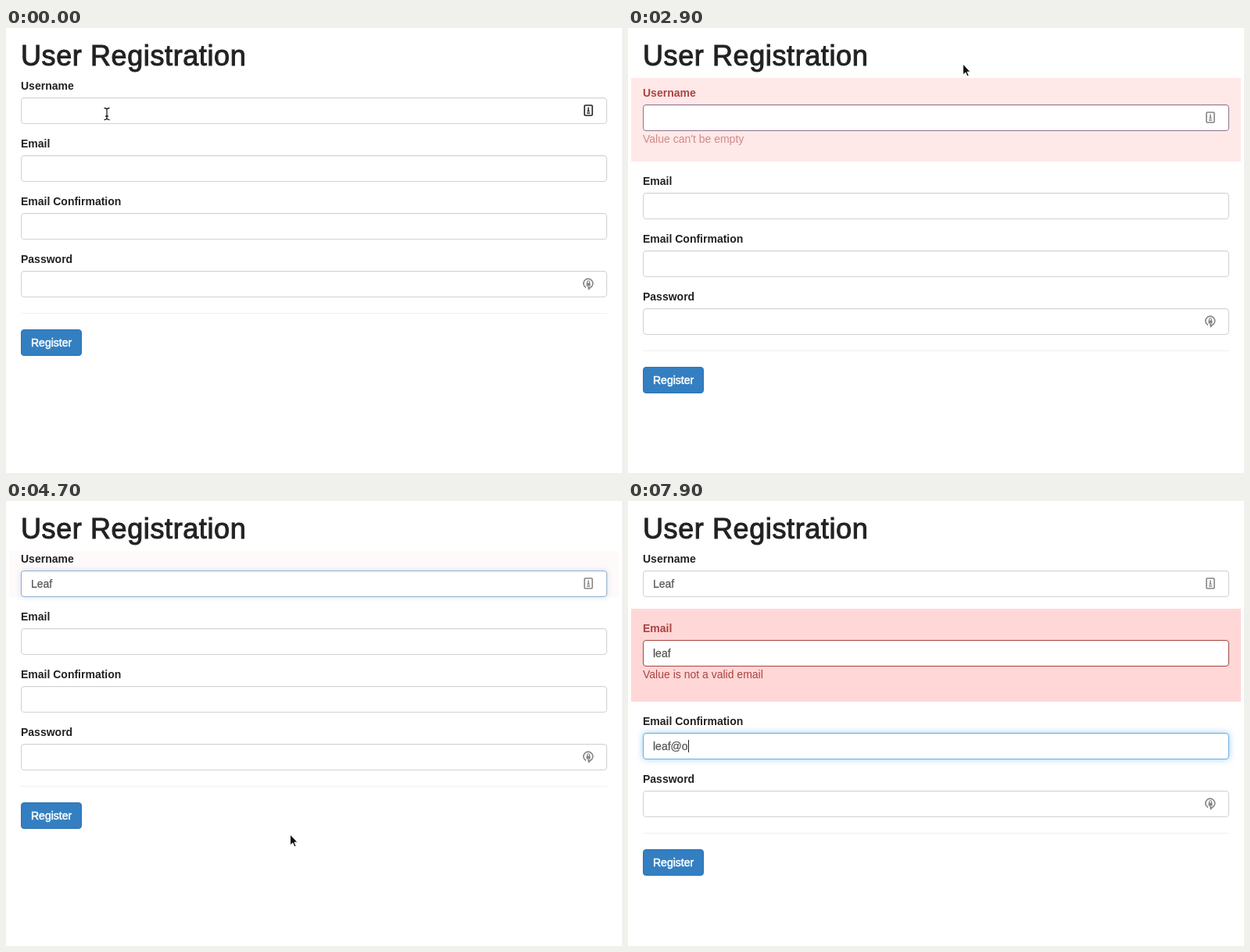
An HTML page that plays this animation: 788x570 px, repeating every 8000 ms.

```html
<!DOCTYPE html>
<html lang="en">
<head>
<meta charset="utf-8">
<title>User Registration</title>
<style>
* { box-sizing: border-box; }
html, body { margin: 0; width: 100%; height: 100%; overflow: hidden; background: #fff; }
body { position: relative; font: 14px/20px "Liberation Sans", Arial, sans-serif; color: #222; }
main { position: absolute; left: 4px; top: 64px; width: 780px; }
h1 { position: absolute; left: 19px; top: 15px; margin: 0; font-size: 36px; line-height: 41px; font-weight: 400;
  letter-spacing: .6px; -webkit-text-stroke: 1px #222; white-space: nowrap; }
.group { padding: 0 15px; margin-bottom: 15px; }
.label { font-weight: 700; height: 25px; }
.input { position: relative; height: 34px; padding: 6px 12px; border: 1px solid #d2d2d2; border-radius: 4px;
  background: #fff; color: #555; white-space: pre; -webkit-text-stroke: .25px #555; }
.caret { display: inline-block; width: 1px; height: 16px; background: #222; vertical-align: -3px; }
.input svg { position: absolute; right: 15px; top: 7px; }
.help { height: 20px; margin-bottom: 10px; color: #a94442; }
.rule { height: 1px; margin: 20px 15px; background: #f0f0f0; }
.button { margin-left: 15px; width: 78px; height: 34px; padding: 6px 12px; border: 1px solid #2f73ae;
  border-radius: 4px; background: #337fc1; color: #fff; -webkit-text-stroke: .5px #fff; }
#mouse { position: absolute; left: 0; top: 0; overflow: visible; }
</style>
</head>
<body>
<h1>User Registration</h1>
<main></main>
<svg id="mouse" width="1" height="1">
  <path id="arrow" d="M0.5 0V14L3.8 11L6 16L8.2 15L6 10.2H10Z" fill="#111" stroke="#fff" stroke-width="1"/>
  <g id="beam" fill="none">
    <path d="M-3.5-7.5Q0-7.5 0-5Q0-7.5 3.5-7.5M0-5V5M-3.5 7.5Q0 7.5 0 5Q0 7.5 3.5 7.5M-2 3H2" stroke="#222" stroke-width="1.3"/>
  </g>
</svg>
<script>
const LOOP = 8000, FADE = 1000;
const GREY = [210, 210, 210, 1], BLUE = [102, 175, 233, 1], RED = [169, 68, 66, 1], DARK = [132, 53, 52, 1];
const BLUE_GLOW = [102, 175, 233, .6], RED_GLOW = [206, 132, 131, 1];

const userIcon = `<svg width="16" height="18" fill="none" stroke="currentColor">
  <rect x="3" y="2" width="10" height="13" rx="1" stroke-width="1.6"/>
  <path d="M8 4.5V9M6 12H10M6.5 9.5H9.5" stroke-width="1.5"/></svg>`;
const lockIcon = `<svg width="16" height="18" fill="none" stroke="#858585">
  <path d="M5 13.5A6 6 0 1 1 10.5 13.5" stroke-width="1.6"/>
  <path d="M7 11.5L11.5 13.5L8 17Z" fill="#858585" stroke="none"/>
  <path d="M6.5 8V6.3A1.5 1.5 0 0 1 9.5 6.3V8" stroke-width="1.1"/>
  <rect x="5.5" y="7.5" width="5" height="4" fill="#858585" stroke="none"/></svg>`;

// focus: [from, to]; text: [time, value]; error: [from, to]
const fields = [
  { name: 'Username', icon: userIcon, help: "Value can't be empty", error: [2570, 3865],
    focus: [[100, 1200], [2050, 2570], [3600, 4660]],
    text: [[400, 'L'], [500, 'Le'], [600, 'Lea'], [700, 'Leaf'], [2200, ''],
      [3865, 'L'], [4100, 'Le'], [4200, 'Lea'], [4300, 'Leaf']] },
  { name: 'Email', help: 'Value is not a valid email', error: [5725, LOOP + FADE],
    focus: [[5100, 5725]], text: [[5400, 'le'], [5500, 'leaf']] },
  { name: 'Email Confirmation', focus: [[6600, LOOP + FADE]],
    text: [[6900, 'l'], [7000, 'le'], [7100, 'lea'], [7200, 'leaf'], [7300, 'leaf@'],
      [7500, 'leaf@o'], [7600, 'leaf@ox'], [7800, 'leaf@o']] },
  { name: 'Password', icon: lockIcon, focus: [], text: [] }
];
// time, x, y
const path = [[0, 129, 110], [900, 129, 110], [1200, 240, 135], [1500, 240, 135], [1800, 283, 122],
  [1900, 283, 122], [2050, 283, 112], [2350, 283, 112], [2550, 428, 46], [3300, 428, 46],
  [3580, 200, 120], [4350, 200, 120], [4600, 363, 427], [4750, 363, 427], [5050, 150, 181],
  [5600, 150, 181], [5720, 225, 430], [5900, 271, 475], [6250, 271, 475], [6580, 141, 309], [LOOP, 141, 309]];
const hidden = [[400, 900], [2150, 2350], [3865, 4350], [5400, 5600], [6900, LOOP]];

const $ = id => document.getElementById(id);
const clamp = v => Math.max(0, Math.min(1, v));
const lerp = (a, b, k) => a + (b - a) * k;
const mix = (a, b, k) => a.map((v, i) => lerp(v, b[i], k));
const rgba = c => `rgba(${c.map(v => v.toFixed(3))})`;
const within = (t, [a, b]) => t >= a && t < b;

// cubic-bezier(.25, .1, .25, 1)
function ease(x) {
  x = clamp(x);
  let lo = 0, hi = 1, s = x;
  for (let i = 0; i < 24; i++) {
    s = (lo + hi) / 2;
    if (.75 * (1 - s) * s + s ** 3 < x) lo = s; else hi = s;
  }
  return .3 * (1 - s) ** 2 * s + 3 * (1 - s) * s * s + s ** 3;
}
const pulse = (t, [a, b], length) =>
  t < b ? ease((t - a) / length) : 1 - ease((t - b) / length);

const main = document.querySelector('main');
for (const f of fields) {
  const group = document.createElement('div');
  group.className = 'group';
  group.innerHTML = `<div class="label">${f.name}</div>
    <div class="input"><span></span><i class="caret"></i>${f.icon || ''}</div>
    <div class="help">${f.help || ''}</div>`;
  main.append(group);
  const find = s => group.querySelector(s);
  Object.assign(f, { group, label: find('.label'), input: find('.input'), value: find('span'),
    caret: find('.caret'), note: find('.help') });
}
main.insertAdjacentHTML('beforeend', '<div class="rule"></div><div class="button">Register</div>');

function drawField(f, t) {
  const open = !!f.error && within(t, f.error);
  const k = f.error ? pulse(t, f.error, FADE) : 0;
  const tint = open ? k : Math.sqrt(k);
  const glow = Math.max(0, ...f.focus.map(span => pulse(t, span, 150)));
  const active = f.focus.find(span => within(t, span));
  const last = f.text.filter(e => e[0] <= t).pop() || [0, ''];

  f.group.style.padding = `${Math.round(15 * k)}px 15px ${15 * k}px`;
  f.group.style.background = rgba(mix([255, 255, 255, 1], [255, 215, 215, 1], tint));
  f.label.style.color = open ? rgba(RED) : '#222';
  f.note.style.display = open ? 'block' : 'none';
  f.note.style.opacity = k;

  const base = open ? BLUE : mix(GREY, BLUE, glow);
  const halo = mix(BLUE_GLOW, RED_GLOW, tint);
  halo[3] *= glow;
  f.input.style.borderColor = rgba(mix(base, mix(RED, DARK, glow), tint));
  f.input.style.boxShadow = `inset 0 1px 1px rgba(0,0,0,.04), 0 0 ${lerp(8, 6, tint)}px ${rgba(halo)}`;

  f.value.textContent = last[1];
  const since = active ? t - Math.max(active[0], last[0]) : 0;
  f.caret.style.visibility = active && since % 1000 < 500 ? 'visible' : 'hidden';
}

function drawMouse(t) {
  const i = path.findIndex(p => p[0] > t), a = path[i - 1], b = path[i];
  const u = (t - a[0]) / (b[0] - a[0]), s = u * u * (3 - 2 * u);
  const x = lerp(a[1], b[1], s), y = lerp(a[2], b[2], s);
  const over = fields.some(f => {
    const r = f.input.getBoundingClientRect();
    return y > r.top && y < r.bottom;
  });
  $('mouse').style.display = hidden.some(h => within(t, h)) ? 'none' : 'block';
  $('mouse').style.transform = `translate(${x}px, ${y}px)`;
  $('beam').style.display = over ? '' : 'none';
  $('arrow').style.display = over ? 'none' : '';
}

function draw(t) {
  fields.forEach(f => drawField(f, t));
  fields[0].input.querySelector('svg').style.color = t < 2500 ? '#222' : '#858585';
  drawMouse(t);
}

const start = performance.now();
function tick() {
  draw((performance.now() - start) % LOOP);
  requestAnimationFrame(tick);
}
tick();
</script>
</body>
</html>
```
